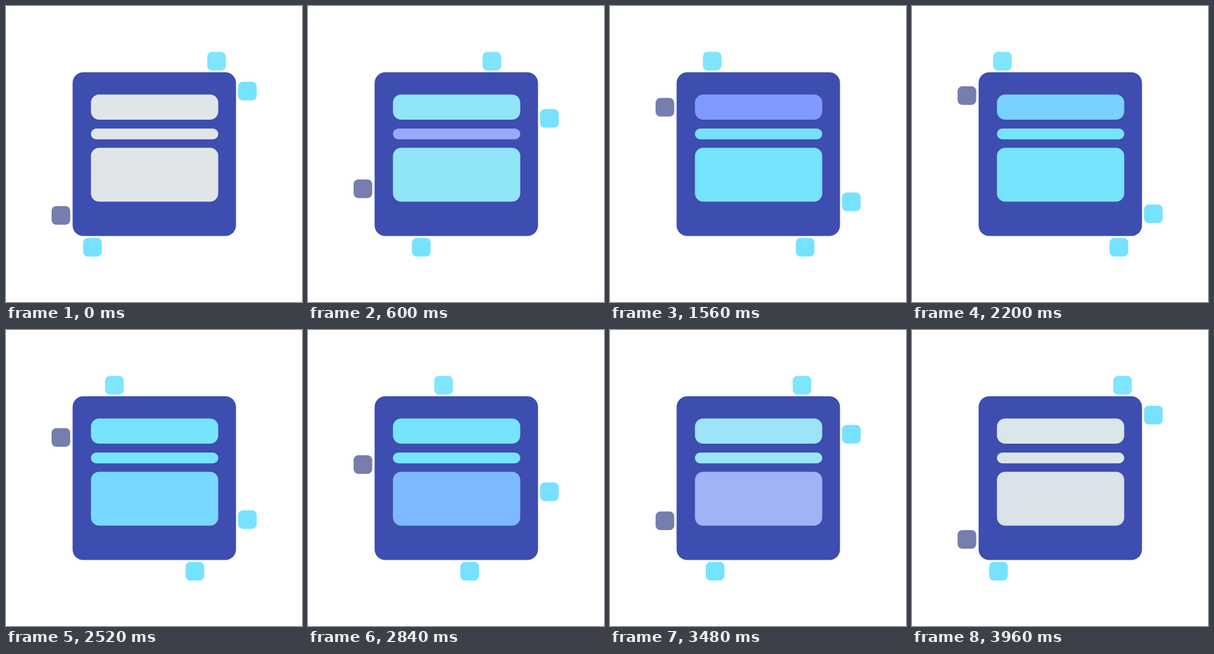
Write an HTML page with a canvas that moves like this. It is 500 px wide and 500 px high and loops after 4000 ms.

```html
<!DOCTYPE html>
<html lang="en">
<head>
<meta charset="utf-8">
<title>Card loader</title>
<style>
  html, body { margin: 0; width: 100%; height: 100%; overflow: hidden; background: #fff; }
  canvas { display: block; width: 100vmin; height: 100vmin; }
</style>
</head>
<body>
<canvas id="stage" width="500" height="500"></canvas>
<script>
const ctx = document.getElementById("stage").getContext("2d");
const LOOP = 4000, STEP = 40, KEY = 800;
const TURN = 2000, BACK = 3960;

const GREY = [224, 230, 232];
const CYAN = [119, 228, 255];
const BLUE = [128, 150, 255];

// One colour per key, KEY ms apart
const bars = [
  { y: 149.5, h: 42.5, r: 14, keys: [GREY, CYAN, BLUE, CYAN, CYAN, GREY] },
  { y: 207, h: 18.2, r: 9, keys: [GREY, BLUE, CYAN, CYAN, CYAN, GREY] },
  { y: 239.5, h: 91, r: 14, keys: [GREY, CYAN, CYAN, CYAN, BLUE, GREY] }
];

const tiles = [
  { x: 340, y: 77.5, dx: -209, dy: 0, color: "#80e5ff" },
  { x: 392, y: 128, dx: 0, dy: 213.5, color: "#77e2ff" },
  { x: 130.3, y: 391.8, dx: 209.5, dy: 0, color: "#75e3ff" },
  { x: 77, y: 338, dx: 0, dy: -208.5, color: "#767eae" }
];

const ease = s => s * s * (3 - 2 * s);

function travel(t) {
  if (t < TURN) return ease(t / TURN);
  return 1 - ease(Math.min(1, (t - TURN) / (BACK - TURN)));
}

function colorAt(keys, t) {
  const i = Math.floor(t / KEY), f = t / KEY - i;
  const mix = keys[i].map((c, k) => Math.round(c + (keys[i + 1][k] - c) * f));
  return `rgb(${mix.join(",")})`;
}

function box(x, y, w, h, r, color) {
  ctx.fillStyle = color;
  ctx.beginPath();
  ctx.roundRect(x, y, w, h, r);
  ctx.fill();
}

function draw(t) {
  ctx.fillStyle = "#fff";
  ctx.fillRect(0, 0, 500, 500);
  box(112.5, 112, 276, 276.5, 18, "#3d4db0");
  for (const b of bars) box(143.5, b.y, 215, b.h, b.r, colorAt(b.keys, t));
  const p = travel(t);
  for (const s of tiles) box(s.x + s.dx * p, s.y + s.dy * p, 31.5, 31.5, 8, s.color);
}

const start = performance.now();
function tick() {
  const t = (performance.now() - start) % LOOP;
  draw(Math.floor(t / STEP) * STEP);
  requestAnimationFrame(tick);
}
tick();
</script>
</body>
</html>
```
